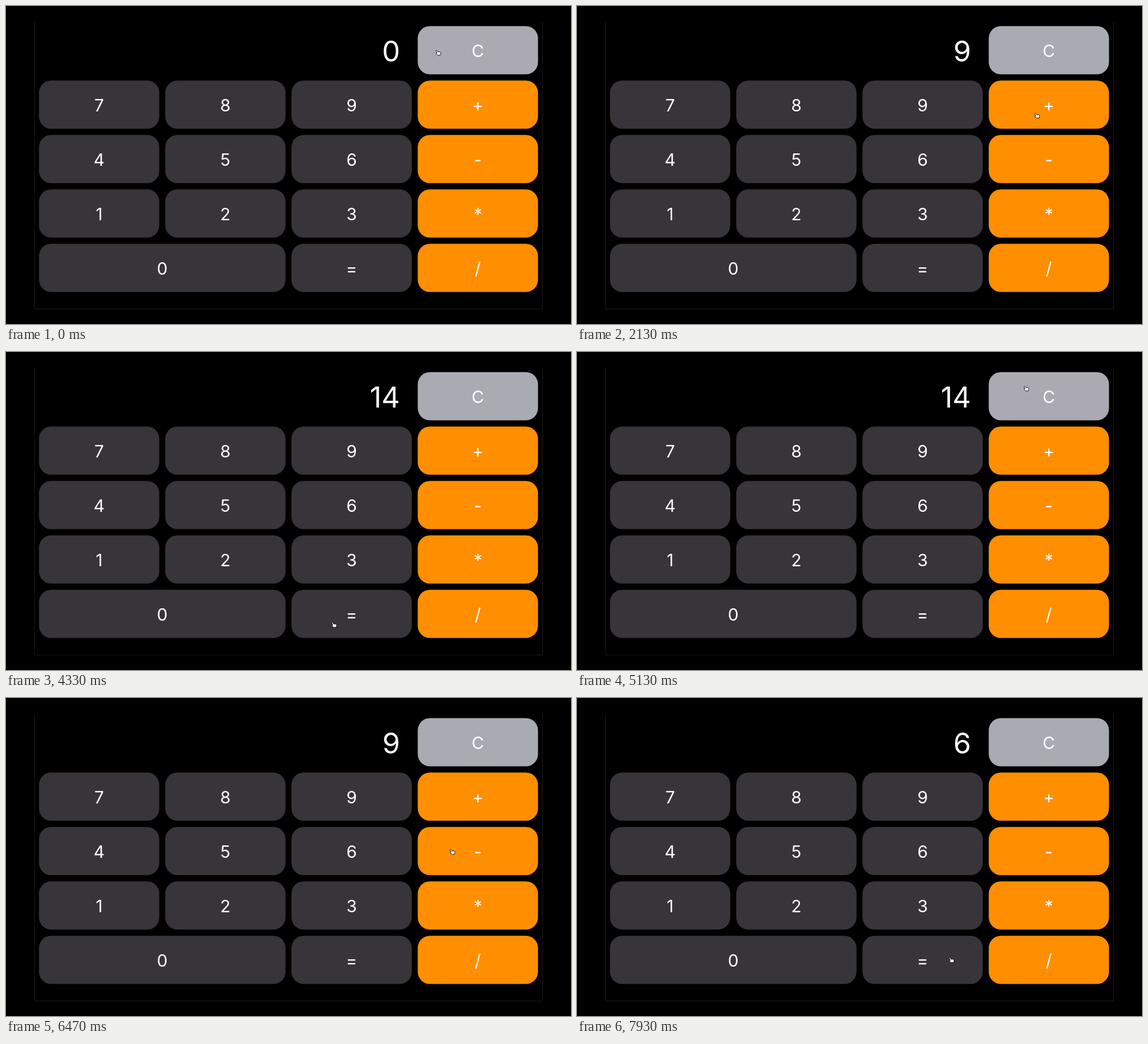
These frames come from a looping animation (998x561 px, 8 s). An HTML page:

```html
<!DOCTYPE html>
<html lang="en">
<head>
<meta charset="utf-8">
<title>Calculator</title>
<style>
  html, body { margin: 0; height: 100%; overflow: hidden; background: #000; }
  svg { display: block; width: 100vw; height: 100vh; }
  text { font-family: Inter, Roboto, sans-serif; fill: #fff; }
  .key text { font-size: 30px; text-anchor: middle; }
  #display { font-size: 50.5px; text-anchor: end; }
</style>
</head>
<body>
<svg viewBox="0 0 998 561">
  <path d="M50.5 28V534.5H947.5V28" fill="none" stroke="#1b1b1b"/>
  <text id="display" x="696" y="98">0</text>
  <g id="keys"></g>
  <path id="hand" fill="#fff" stroke="#000" stroke-width=".9" stroke-linejoin="round"
    d="M-3.6-3.2Q-2.3-4.7-1.3-3L-.1-1.1 3.3-1.2Q5.1-.7 5.1 1.3L4.3 4.6.1 4.9-3.5 1.9Q-3.3.1-1.7 1.1Z"/>
</svg>
<script>
const LOOP = 8000, FPS = 15, MOVE_TICKS = 3;
const DARK = '#373539', ORANGE = '#ff8f00', GREY = '#a8abb2', GREY_HOVER = '#aba9b1';
const $ = id => document.getElementById(id);

// Pointer stops: arrival tick, x, y
const STOPS = [
  [0, 763, 82], [5, 545, 184], [12, 505, 208], [26, 566, 171], [32, 812, 193],
  [44, 409, 314], [54, 626, 532], [62, 579, 481], [72, 808, 136], [77, 793, 64],
  [86, 582, 170], [97, 788, 271], [106, 625, 291], [115, 806, 385], [119, 661, 462]
];
const PRESSES = [18, 36, 47, 64, 80, 91, 101, 109];

const keys = [];

function addKey(label, col, row, color, span = 1) {
  const x = 58.3 + col * 223, y = 35.4 + row * 96, w = 212.4 + (span - 1) * 223, h = 85.2;
  $('keys').insertAdjacentHTML('beforeend', `<g class="key">
    <rect x="${x}" y="${y}" width="${w}" height="${h}" rx="21.5" fill="${color}"/>
    <text x="${x + w / 2}" y="${y + 54.3}">${label}</text></g>`);
  keys.push({ label, x, y, w, h, node: $('keys').lastElementChild });
}

addKey('C', 3, 0, GREY);
['789+', '456-', '123*'].forEach((row, r) =>
  [...row].forEach((label, c) => addKey(label, c, r + 1, c < 3 ? DARK : ORANGE)));
addKey('0', 0, 4, DARK, 2);
addKey('=', 2, 4, DARK);
addKey('/', 3, 4, ORANGE);

const ease = p => p * p * (3 - 2 * p);

function pointerAt(tick) {
  let [, x, y] = STOPS[0];
  for (const [arrival, toX, toY] of STOPS.slice(1)) {
    const p = ease(Math.max(0, Math.min(1, 1 + (tick - arrival) / MOVE_TICKS)));
    x += (toX - x) * p;
    y += (toY - y) * p;
  }
  return [x, y];
}

// The fingertip sits a little above the pointer's centre
function keyAt([px, py]) {
  const tipY = py - 4;
  return keys.find(({ x, y, w, h }) => px > x && px < x + w && tipY > y && tipY < y + h);
}

const OPS = {
  '+': (a, b) => a + b, '-': (a, b) => a - b,
  '*': (a, b) => a * b, '/': (a, b) => a / b
};

function calculate(labels) {
  let shown = 0, stored = 0, op = null, fresh = true;
  for (const label of labels) {
    if (label === 'C') {
      shown = stored = 0;
      op = null;
    } else if (label === '=') {
      if (op) shown = OPS[op](stored, shown);
      op = null;
    } else if (OPS[label]) {
      stored = shown;
      op = label;
    } else {
      shown = fresh ? +label : shown * 10 + +label;
    }
    fresh = !/\d/.test(label);
  }
  return shown;
}

function draw(time) {
  const tick = Math.floor((time % LOOP + 5) * FPS / 1000);
  const pointer = pointerAt(tick), hovered = keyAt(pointer);
  $('hand').setAttribute('transform', `translate(${pointer})`);

  const entered = PRESSES.filter(t => t < tick).map(t => keyAt(pointerAt(t)).label);
  $('display').textContent = calculate(entered);

  const pressed = PRESSES.includes(tick) && hovered;
  for (const key of keys) key.node.setAttribute('opacity', key === pressed ? 0.8 : 1);

  const clear = keys[0];
  clear.node.firstElementChild.setAttribute('fill', hovered === clear ? GREY_HOVER : GREY);
}

function loop() {
  draw(performance.now());
  requestAnimationFrame(loop);
}
loop();
</script>
</body>
</html>
```
